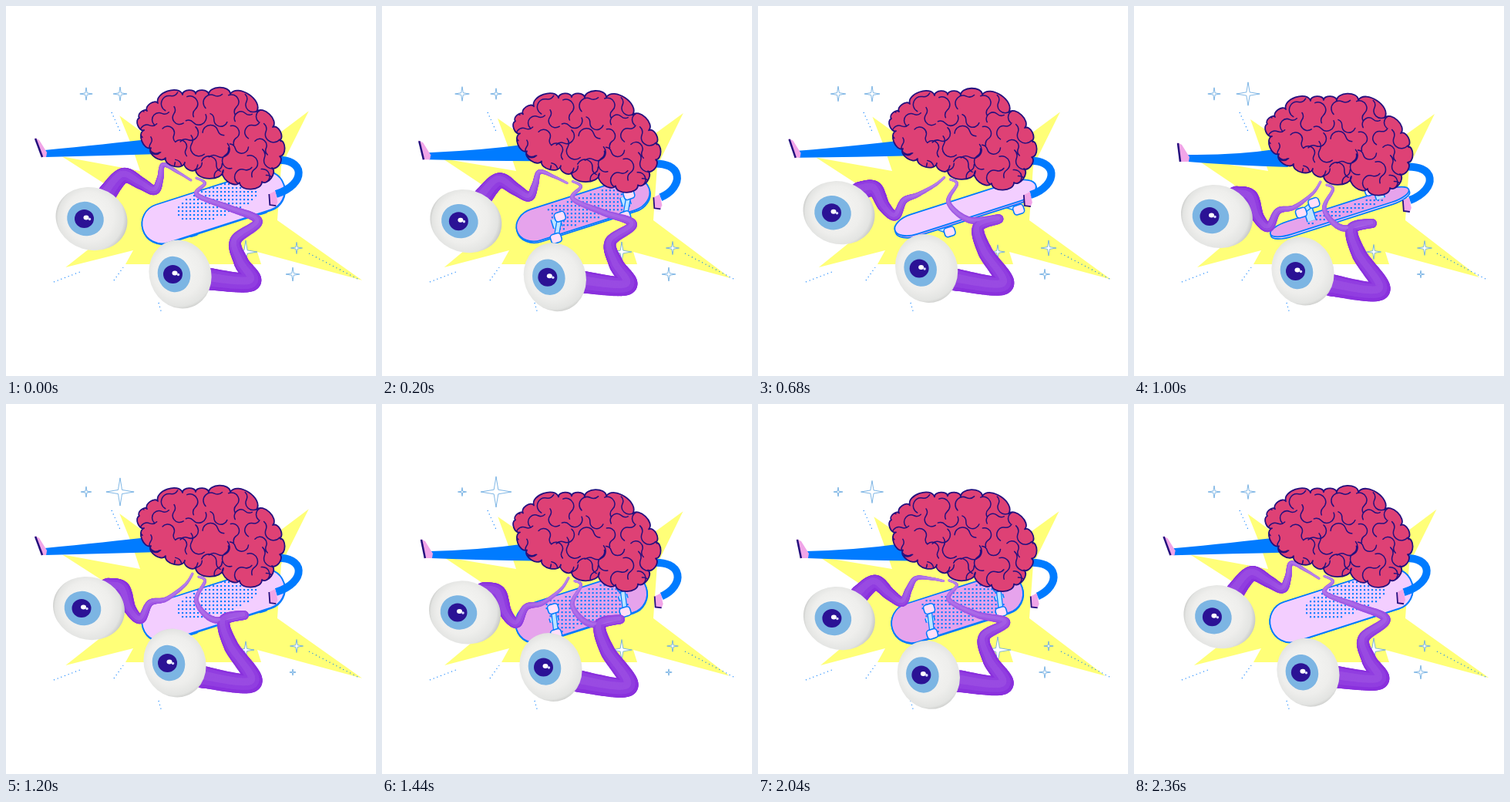
These frames come from a looping animation (480 by 480 pixels, 2400 ms). An HTML page with a canvas:

```html
<!DOCTYPE html>
<html>
<head>
<meta charset="utf-8">
<style>
html, body { margin: 0; width: 100%; height: 100%; overflow: hidden; background: #fff; }
canvas { display: block; width: 480px; height: 480px; }
</style>
</head>
<body>
<canvas id="stage" width="480" height="480"></canvas>
<script>
const ctx = document.getElementById('stage').getContext('2d');
const LOOP = 2400, FLIP = 600, STEP = 40, TAU = Math.PI * 2, TILT = -.31;
const BLUE = '#007bff', NAVY = '#24107e', PINK = '#f1a5e8';

const ease = p => .5 - .5 * Math.cos(Math.PI * Math.min(1, p));
const mix = (a, b, p) => a + (b - a) * p;

function tracePath(points) {
  ctx.beginPath();
  points.forEach(([x, y]) => ctx.lineTo(x, y));
}

function shape(points, fill) {
  tracePath(points);
  ctx.closePath();
  ctx.fillStyle = fill;
  ctx.fill();
}

function line(points, color, width) {
  tracePath(points);
  ctx.strokeStyle = color;
  ctx.lineWidth = width;
  ctx.stroke();
}

function fillAndStroke(fill, stroke, width) {
  ctx.fillStyle = fill;
  ctx.fill();
  ctx.strokeStyle = stroke;
  ctx.lineWidth = width;
  ctx.stroke();
}

function disc(x, y, rx, ry, fill, angle = 0) {
  ctx.beginPath();
  ctx.ellipse(x, y, rx, ry, angle, 0, TAU);
  ctx.fillStyle = fill;
  ctx.fill();
}

function drawBurst(k) {
  shape([
    [147 + 4 * k, 142 + 5 * k], [192, 175], [340, 176], [393 - 3 * k, 136 + 4 * k],
    [357, 208], [352, 278], [463 - 15 * k, 356 - 4 * k], [326, 319], [331, 335],
    [155, 335], [165, 317], [77 + 5 * k, 339], [142, 288], [130, 232],
    [72 + 9 * k, 195 + 4 * k], [174, 214], [163, 181]
  ], '#ffff78');
  ctx.setLineDash([1, 4]);
  [[137, 138, 149, 165], [62, 358, 96, 345], [140, 356, 152, 339],
   [198, 385, 202, 399], [393, 321, 456, 354]].forEach(([x, y, u, v]) =>
    line([[x, y], [u, v]], BLUE, 1.2));
  ctx.setLineDash([]);
}

function drawSpark(t, x, y, size, swing, peak) {
  const r = size + swing * Math.cos(TAU * (t - peak) / LOOP);
  const star = Array.from({ length: 8 }, (_, i) => {
    const reach = i % 2 ? r * .2 : r, a = i * TAU / 8;
    return [x + reach * Math.cos(a), y + reach * Math.sin(a)];
  });
  tracePath(star);
  ctx.closePath();
  fillAndStroke('#fff', '#5fa4df', .8);
}

function drawSparks(t) {
  drawSpark(t, 104, 114, 7.5, 2.5, 500);
  drawSpark(t, 148, 114, 13.5, 6.5, 1500);
  drawSpark(t, 377, 314, 8, 2, 700);
  drawSpark(t, 372, 348, 6.5, 2.5, 100);
  drawSpark(t, 311, 319, 13, 4, 2000);
}

function drawLeg(swing) {
  const x = 37 + 19 * swing, y = 171 + 6 * swing;
  const top = 172 + 13 * swing, bottom = 192 + 17 * swing, sag = 5 * swing;
  ctx.beginPath();
  ctx.moveTo(x + 13, y + 16);
  ctx.quadraticCurveTo(130, (y + 16 + top) / 2 + sag, 190, top);
  ctx.lineTo(200, bottom);
  ctx.quadraticCurveTo(130, (y + 25 + bottom) / 2 + sag / 3, x + 14, y + 25);
  ctx.fillStyle = BLUE;
  ctx.fill();
  const heel = x + 9 - 6 * swing;
  shape([[x, y], [x + 6, y + 3], [x + 16, y + 19], [x + 15, y + 25], [heel, y + 25]], PINK);
  line([[x + 1, y + 1], [heel + 1, y + 25]], NAVY, 2.5);
}

function drawArm(swing, cos) {
  const x = 347.5 - 6.5 * cos, y = 242 + 8 * swing, bend = 390 + 4 * swing;
  ctx.beginPath();
  ctx.moveTo(347, 200 + 9 * swing);
  ctx.bezierCurveTo(bend, 196 + 8 * swing, bend, 232 + 6 * swing, x + 9, y + 2);
  ctx.strokeStyle = BLUE;
  ctx.lineWidth = 10;
  ctx.stroke();
  shape([[x, y + 2], [x + 8, y - 2], [x + 11, y + 12], [x + 9, y + 17], [x + 1, y + 17]], PINK);
  line([[x, y + 2], [x + 1, y + 16], [x + 9, y + 17]], NAVY, 1.8);
}

function deck(half, height, dy, fill) {
  const end = 26;
  ctx.beginPath();
  ctx.ellipse(half - end, dy, end, height, 0, -TAU / 4, TAU / 4);
  ctx.ellipse(end - half, dy, end, height, 0, TAU / 4, TAU * 3 / 4);
  ctx.closePath();
  fillAndStroke(fill, BLUE, 1.8);
}

function drawTrucks(cos, sin) {
  [-38, 56].forEach(x => {
    const y = 18 * sin;
    const base = [[x, 0], [x, y]];
    const axle = [-1, 1].map(s => [x + s * 10 * Math.abs(sin), y + s * 17 * cos]);
    line(base, BLUE, 13);
    line(base, '#bfe4ff', 10);
    line(axle, BLUE, 7);
    line(axle, '#bfe4ff', 4.5);
    axle.forEach(([wx, wy]) => {
      ctx.beginPath();
      ctx.roundRect(wx - 7, wy - 6, 14, 12, 4);
      fillAndStroke('#ffdff9', BLUE, 1.6);
    });
  });
}

// The print stays aligned with the screen while the deck is tilted.
function drawDots(height, light) {
  const c = Math.cos(TILT), s = Math.sin(TILT);
  ctx.save();
  ctx.rotate(-TILT);
  ctx.fillStyle = BLUE;
  for (let x = -60; x <= 65; x += 5) {
    for (let y = -40; y <= 40; y += 5) {
      const u = x * c + y * s, v = y * c - x * s;
      const inside = light
        ? Math.hypot((u - 7) / 55, (v + 6) / 21) < 1
        : Math.abs(u - 8) < 52 && Math.abs(v) < height - 4;
      if (inside) ctx.fillRect(x - 1, y - 1, 2.1, 2.1);
    }
  }
  ctx.restore();
}

function drawBoard(swing, cos, sin) {
  const light = cos > 0, under = Math.max(0, -cos);
  const half = 96 - 8 * under, height = 4 + 23 * Math.abs(cos);
  ctx.save();
  ctx.translate(269 - 11 * under, 261 + 6 * swing);
  ctx.rotate(TILT);
  if (light) drawTrucks(cos, sin);
  deck(half, height, 3 * Math.abs(sin), light ? '#e6a3ec' : '#f3ceff');
  deck(half, height, 0, light ? '#f3ceff' : '#e6a3ec');
  if (!light || cos > .8) drawDots(height, light);
  if (!light) drawTrucks(cos, sin);
  ctx.restore();
}

// Key points from the brain to the eye, at both ends of the sway.
const leftStalk = {
  from: [[240, 226], [222, 215], [204, 206], [200, 224], [193, 239], [175, 230], [152, 220], [130, 245]],
  to: [[242, 220], [232, 235], [208, 253], [187, 258], [175, 279], [161, 266], [151, 240], [132, 238]],
  girth: 22, taper: 1.6
};
const rightStalk = {
  from: [[247, 223], [258, 230], [248, 245], [290, 262], [327, 279], [298, 304], [305, 332], [318, 358], [262, 354]],
  to: [[250, 224], [258, 230], [247, 256], [270, 280], [309, 274], [283, 281], [292, 314], [320, 361], [254, 354]],
  girth: 26, taper: 1.6
};

function spline(points, s) {
  const last = points.length - 1, i = Math.min(Math.floor(s), last - 1), f = s - i;
  const at = k => points[Math.max(0, Math.min(last, k))];
  const [a, b, c, d] = [at(i - 1), at(i), at(i + 1), at(i + 2)];
  return [0, 1].map(j => b[j] + .5 * f * (c[j] - a[j] +
    f * (2 * a[j] - 5 * b[j] + 4 * c[j] - d[j] + f * (3 * (b[j] - c[j]) + d[j] - a[j]))));
}

function drawStalk({ from, to, girth, taper }, sway, bob) {
  const points = from.map(([x, y], i) => [mix(x, to[i][0], sway), mix(y, to[i][1], sway) + bob]);
  const last = points.length - 1;
  [1, .75, .4].forEach((scale, layer) => {
    for (let s = 0; s <= last; s += .04) {
      const [x, y] = spline(points, s), q = s / last;
      const r = (3 + girth * q ** taper) / 2, shift = layer * r * .1;
      const tone = 68 - 15 * Math.min(1, q * 1.4) + layer * 3;
      disc(x - shift, y - shift, r * scale, r * scale, `hsl(271,72%,${tone}%)`);
    }
  });
}

// Notches of the outline, clockwise; a round lobe bulges between each pair.
const notches = [
  [179, 161], [173, 145], [183, 136], [197, 126], [229, 115], [246, 114], [263, 115],
  [291, 114], [325, 137], [346, 157], [355, 174], [355, 195], [345, 210], [332, 228],
  [303, 229], [282, 213], [246, 212], [232, 203], [207, 197], [188, 184]
];
const brain = new Path2D();
brain.moveTo(...notches[0]);
notches.forEach(([x, y], i) => {
  const [u, v] = notches[(i + 1) % notches.length];
  const ox = (v - y) * .42, oy = (x - u) * .42;
  brain.bezierCurveTo(x + ox, y + oy, u + ox, v + oy, u, v);
});
brain.closePath();

// Winding folds: one hooked curve in each cell of a staggered grid.
const folds = new Path2D();
let seed = 7;
const random = () => (seed = seed * 16807 % 2147483647) / 2147483647;
for (let row = 0; row < 6; row++) {
  for (let col = 0; col < 7; col++) {
    const x = 181 + col * 27 + row % 2 * 13 + random() * 5;
    const y = 124 + row * 19 + random() * 5;
    const a = random() * TAU, r = 8 + random() * 3;
    folds.moveTo(x + r * Math.cos(a), y + r * Math.sin(a));
    folds.arc(x, y, r, a, a + 2.8);
    const hx = x + 1.9 * r * Math.cos(a + 2.8), hy = y + 1.9 * r * Math.sin(a + 2.8);
    folds.arc(hx, hy, r * .9, a + 2.8 + Math.PI, a + 1.6 + Math.PI, true);
  }
}

function drawBrain(bob) {
  ctx.save();
  ctx.translate(0, bob);
  ctx.lineJoin = ctx.lineCap = 'round';
  ctx.fillStyle = '#de4175';
  ctx.fill(brain);
  ctx.strokeStyle = NAVY;
  ctx.lineWidth = 1.8;
  ctx.stroke(brain);
  ctx.clip(brain);
  ctx.lineWidth = 1.5;
  ctx.stroke(folds);
  ctx.restore();
}

function drawEye(x, y, rx, ry, angle) {
  const wide = rx > ry;
  ctx.save();
  ctx.translate(x, y);
  const shade = ctx.createRadialGradient(-8, -8, 6, 0, 0, 49);
  shade.addColorStop(0, '#f6f6f4');
  shade.addColorStop(.6, '#eeeeec');
  shade.addColorStop(.85, '#e3e4e2');
  shade.addColorStop(1, '#bdbebc');
  disc(0, 0, rx, ry, shade, angle);
  disc(-8, 0, wide ? 24 : 21, wide ? 22 : 23.5, '#7cb5e3', angle);
  disc(-9.5, 0, 12.5, 12, '#2b1295');
  disc(-7, -1.5, 3.5, 3, '#fff');
  disc(-2.5, .5, 1.7, 1.8, '#d9ddff');
  ctx.restore();
}

function draw(t) {
  const p = ((t + 20) % FLIP) / FLIP;
  const swing = ease(p < .7 ? p / .7 : (1 - p) / .3), bob = 8 * swing;
  const turn = TAU * (t + 30) / FLIP, cos = Math.cos(turn), sin = Math.sin(turn);
  const sway = ease(Math.min(t, LOOP - t) / 960), arc = Math.sin(Math.PI * sway);
  ctx.fillStyle = '#fff';
  ctx.fillRect(0, 0, 480, 480);
  drawBurst(Math.sqrt(swing));
  drawSparks(t);
  drawLeg(swing);
  drawBoard(swing, cos, sin);
  drawArm(swing, cos);
  drawStalk(leftStalk, sway, bob);
  drawStalk(rightStalk, sway, bob);
  drawBrain(bob);
  drawEye(111 - 3.5 * sway - 5.5 * arc, 276 - 11 * sway + bob, 47, 40.5, .3);
  drawEye(226 - 7 * sway - 3 * arc, 348 - 12 * sway + 2 * arc + bob, 40, 45, -.35);
}

const start = performance.now();
function tick() {
  const t = (performance.now() - start) % LOOP;
  draw(Math.floor(t / STEP) * STEP);
  requestAnimationFrame(tick);
}
tick();
</script>
</body>
</html>
```
